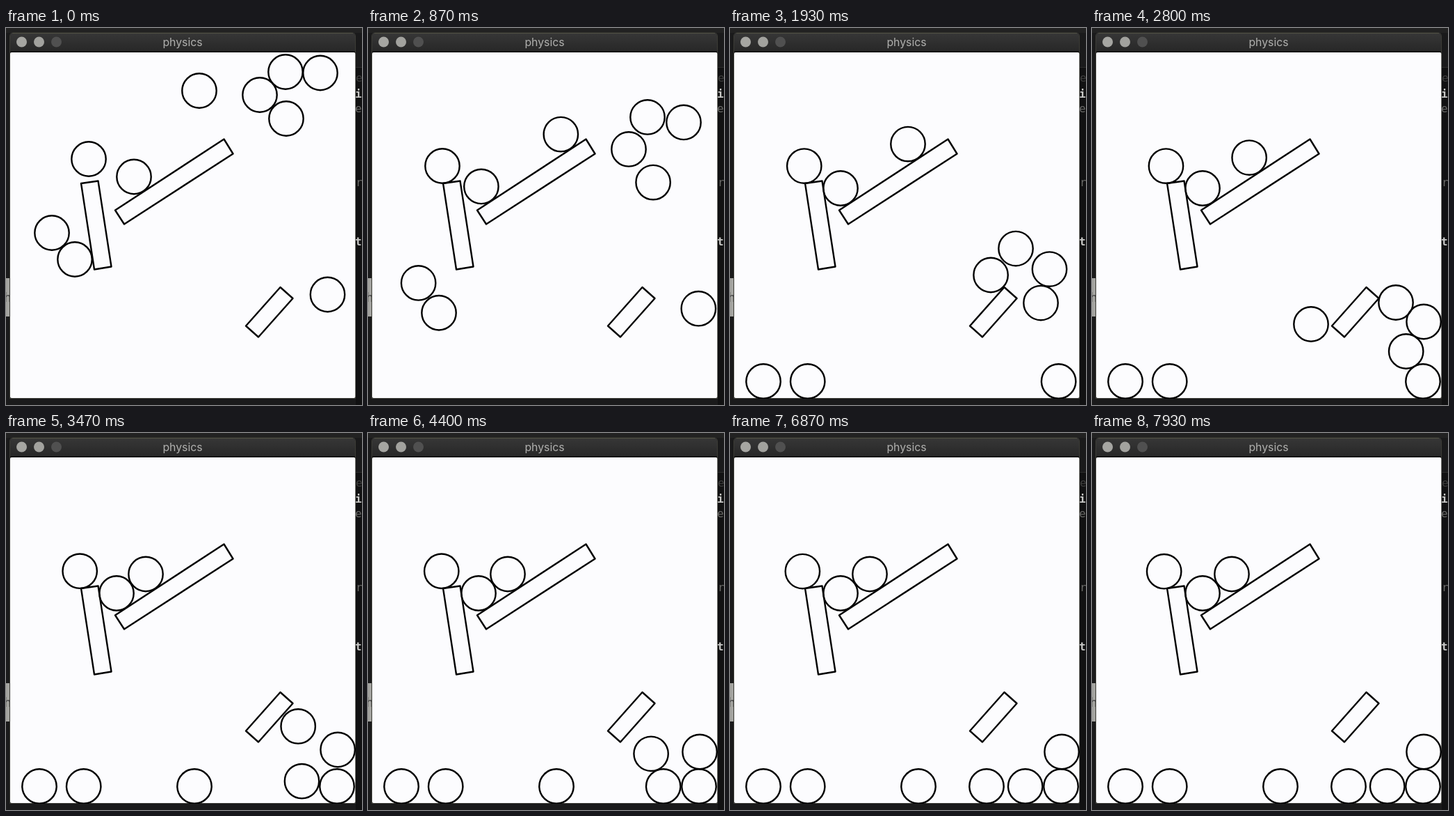
Write an HTML page that moves like this. It is 512x541 px and loops after 8000 ms.

```html
<!DOCTYPE html>
<html lang="en">
<head>
<meta charset="utf-8">
<title>physics</title>
<style>
  html, body { margin: 0; width: 100%; height: 100%; overflow: hidden; background: #1a1a1b; }
  svg { display: block; width: 100vw; height: 100vh; }
  .shape { fill: none; stroke: #000; stroke-width: 2.4; stroke-linejoin: round; }
  .title { font: 15.8px Inter, "Open Sans", sans-serif; fill: #b0b0ae; text-anchor: middle; }
  .code { font: 16px "DejaVu Sans Mono", "Noto Sans Mono", monospace; fill: #6a6a68; }
  .bold { font-weight: bold; fill: #c8c8c6; }
</style>
</head>
<body>
<svg viewBox="0 0 512 541" preserveAspectRatio="none">
  <defs>
    <linearGradient id="bar" x1="0" y1="0" x2="0" y2="1">
      <stop offset="0" stop-color="#373737"/>
      <stop offset="1" stop-color="#272727"/>
    </linearGradient>
    <clipPath id="view"><rect x="6" y="35" width="497" height="497"/></clipPath>
  </defs>

  <rect width="512" height="541" fill="#1a1a1b"/>
  <rect width="512" height="7" fill="#222222"/>
  <rect x="503" y="57" width="9" height="484" fill="#111112"/>
  <path d="M503 56.5h9" stroke="#2c2c2c"/>
  <rect y="359" width="5" height="55" fill="#a4a4a0"/>
  <text class="code" x="-3" y="393" style="font-size:18px;fill:#444">h</text>
  <g class="code">
    <text x="503" y="77" fill-opacity=".5">e</text>
    <text class="bold" x="502" y="100">i</text>
    <text x="502" y="121">e</text>
    <text x="503" y="227">r</text>
    <text class="bold" x="502" y="312">te</text>
  </g>

  <path d="M5.500 531.500V12q0-5 5-5h487q5 0 5 5v519.500z" fill="#1a1a1b" stroke="#3c3c36"/>
  <path d="M6 34V12q0-5 5-5h486q5 0 5 5v22z" fill="url(#bar)"/>
  <path d="M9 7.500h490" stroke="#505044"/>
  <path d="M6 34.300h496" stroke="#080808" stroke-width="1.400"/>
  <circle cx="22.5" cy="20" r="7.5" fill="#a6a6a2"/>
  <circle cx="47.5" cy="20" r="7.5" fill="#a2a29e"/>
  <circle cx="72.5" cy="20" r="7.5" fill="#505050"/>
  <text class="title" x="254" y="26">physics</text>

  <rect x="6" y="35" width="496.3" height="496" rx="2" fill="#fcfcfe"/>
  <g class="shape" clip-path="url(#view)">
    <path d="M108 223L132.500 219.500L151.500 342.500L127 346.500z"/>
    <path d="M157 261.500L313.500 159.500L326.500 180.500L170 281.500z"/>
    <path d="M394.500 372L412.500 388L363 443.500L345 427.500z"/>
    <g id="balls"></g>
  </g>
</svg>
<script>
const LOOP = 8000, STEP = 200 / 3, LAST = 119;
const GRAVITY = 115, RADIUS = 24.7, FLOOR = 507, WALL = 477.5;
const layer = document.getElementById('balls');
const balls = [];

const lerp = (a, b, u) => a + (b - a) * u;
// Past the right wall a ball comes back at half speed.
const bounce = x => x > WALL ? WALL - (x - WALL) / 2 : x;

class Ball {
  constructor(x, y) {
    this.end = { t: 0, x, y };
    this.moves = [];
    this.node = document.createElementNS('http://www.w3.org/2000/svg', 'circle');
    this.node.setAttribute('r', RADIUS);
    layer.append(this.node);
    balls.push(this);
  }

  move(t, x, y, path) {
    const from = this.end, to = { t, x, y }, span = t - from.t;
    this.moves.push({ t, at: now => path(from, to, (now - from.t) / span, span) });
    this.end = { t, x: bounce(x), y };
    return this;
  }

  fall(t, x, y) {
    return this.move(t, x, y, (a, b, u, span) =>
      [bounce(lerp(a.x, b.x, u)), lerp(a.y, b.y, u) - GRAVITY / 2 * span * span * u * (1 - u)]);
  }

  ease(t, x, y, curve) {
    return this.move(t, x, y, (a, b, u) => [lerp(a.x, b.x, curve(u)), lerp(a.y, b.y, curve(u))]);
  }

  slide(t, x, y) { return this.ease(t, x, y, u => u ** 1.5); }

  settle(t, x, y) { return this.ease(t, x, y, u => 1 - (1 - u) ** 2); }

  // Tips over a ball lying on the floor at pivotX and comes to rest left of it.
  roll(t, x, pivotX) {
    return this.move(t, x, FLOOR, (a, b, u) => {
      const dx = pivotX - a.x, dy = FLOOR - a.y;
      const angle = lerp(Math.atan2(dx, dy), Math.PI / 2, u ** 3);
      const reach = lerp(Math.hypot(dx, dy), pivotX - b.x, u ** 3);
      return [pivotX - reach * Math.sin(angle), FLOOR - reach * Math.cos(angle)];
    });
  }

  place(t) {
    const move = this.moves.find(m => m.t > t);
    const [x, y] = move ? move.at(t) : [this.end.x, this.end.y];
    this.node.setAttribute('cx', x);
    this.node.setAttribute('cy', y);
  }
}

// Shared moments: first collision, landing on the block, pile-up at the wall
const CLASH = .867, LAND = 1.933, PILE = 2.8;
const cornerX = 476, besideX = 424.7;

// Ramp and post
new Ball(278, 90).fall(.83, 277.5, 152.5).slide(3.4, 201, 202.5);
new Ball(184, 213.5).slide(.97, 159, 230);
new Ball(119, 188).fall(.6, 107, 198).slide(8, 103.6, 198.7);

// Left floor
new Ball(66, 294).fall(1.45, 77, 463).fall(1.75, 48, FLOOR);
new Ball(99, 332).fall(1.44, 104, FLOOR).slide(1.65, 111.7, FLOOR);

// Right corner
new Ball(462.5, 382.5).fall(1.72, 488, FLOOR).slide(2.7, cornerX, FLOOR);
new Ball(403, 130).fall(1.585, 416, 363).slide(LAND, 447, 394.5)
  .settle(PILE, 451.7, 464).roll(3.5, besideX, cornerX);
new Ball(452, 64.5).fall(CLASH, 454, 135.5).fall(LAND, 459.5, 346)
  .settle(PILE, 478.3, 421.5).fall(3.5, 478.3, 457.5);
new Ball(402, 63).fall(CLASH, 402, 128).fall(LAND, 411, 316.5)
  .settle(PILE, 437, 394).fall(3.85, 410.5, 459.5).roll(5.3, 369, besideX);

// Over the block to the middle of the floor
new Ball(365, 96).fall(CLASH, 375, 174).fall(1.9, 375.5, 354)
  .slide(PILE, 315, 425).fall(3.38, 271, FLOOR);

const start = performance.now();
function tick() {
  const elapsed = (performance.now() - start) % LOOP;
  const step = Math.min(LAST, Math.floor(elapsed / STEP + .06));
  balls.forEach(ball => ball.place(step * STEP / 1000));
  requestAnimationFrame(tick);
}
tick();
</script>
</body>
</html>
```
